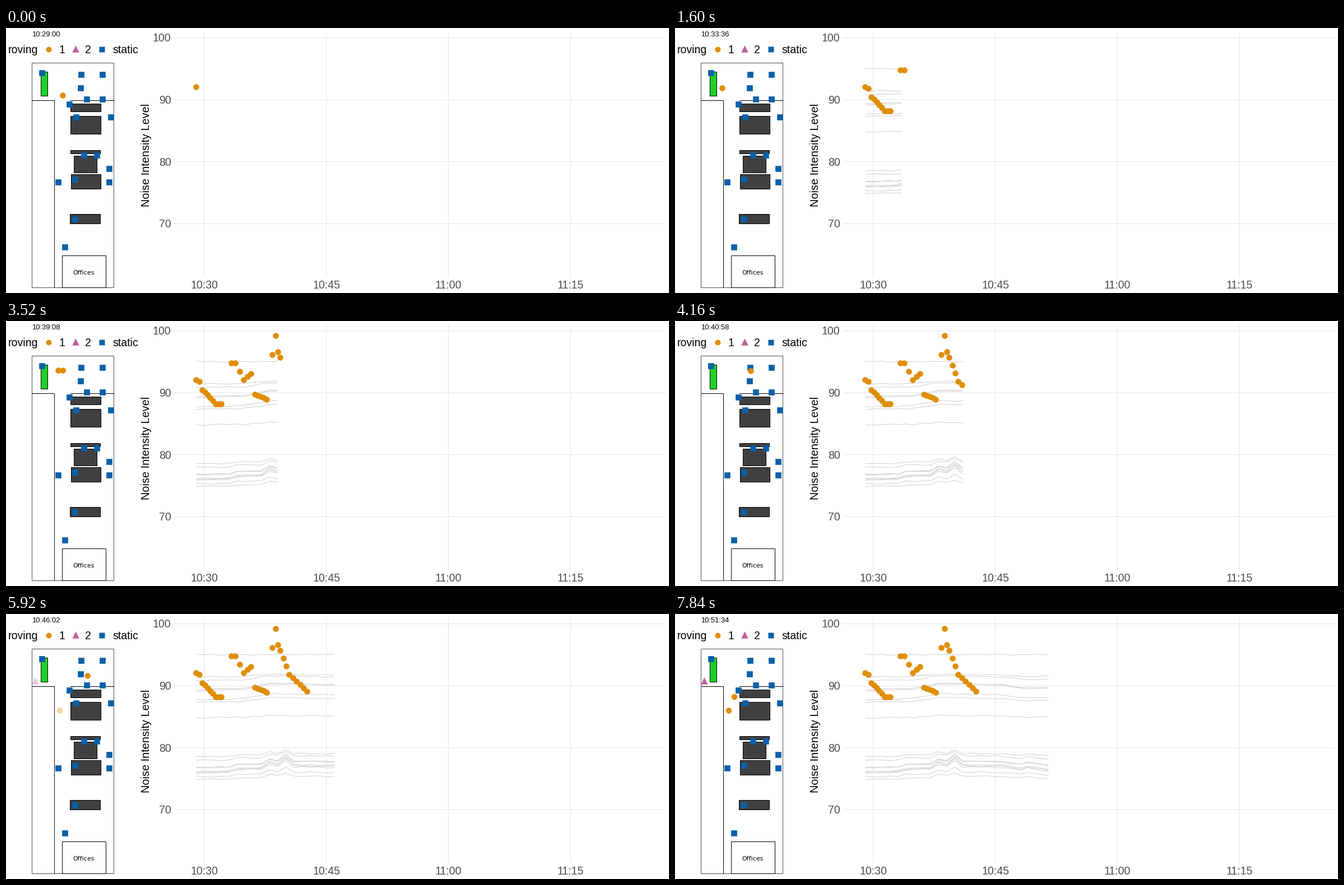
Write a matplotlib script that moves like this. It is 1183x473 px and loops after 8000 ms.

```python
import numpy as np
import matplotlib.pyplot as plt
from matplotlib.animation import FuncAnimation
from matplotlib.patches import Rectangle

plt.rcParams["path.snap"] = False

W, H, DPI = 1183, 473, 64
PT = 72 / DPI                      # points per pixel
FRAMES, INTERVAL = 50, 160
STEP = 27.633                      # clock seconds per frame
X0, MINUTE = 339, 14.515           # chart x at 10:29, pixels per minute

ORANGE, PINK, BLUE = "#DF8E06", "#BF6299", "#0A60A8"
GREY, GRID = "#4D4D4D", "#E8E8E8"

# Whole coordinates are pixel centres
fig = plt.figure(figsize=(W / DPI, H / DPI), dpi=DPI, facecolor="white")
ax = fig.add_axes([0, 0, 1, 1])
ax.set_xlim(-0.5, W - 0.5)
ax.set_ylim(H - 0.5, -0.5)
ax.axis("off")


def text(x, y, s, px=19.5, color="black", font="Liberation Sans", **kw):
    kw.setdefault("va", "baseline")
    return ax.text(x, y, s, fontsize=px * PT, color=color, family=font, **kw)


def line(xs, ys, color="black", px=1.0, z=3):
    return ax.plot(xs, ys, color=color, lw=px * PT, zorder=z,
                   solid_capstyle="butt")[0]


def box(x0, y0, x1, y1, fill, edge="black"):
    ax.add_patch(Rectangle((x0, y0), x1 - x0, y1 - y0, fc=fill, ec=edge,
                           lw=PT, zorder=2))


def marks(points, shape, color, px, z):
    xs, ys = zip(*points) if points else ((), ())
    return ax.scatter(xs, ys, s=(px * PT) ** 2, marker=shape, c=color,
                      linewidths=0, zorder=z)


def level_y(level):
    return 17 + (100 - level) * 11.05


# Chart grid and labels
for level in (100, 90, 80, 70):
    y = level_y(level)
    line([300, 1177], [y, y], GRID, 1.2, 1)
    text(294, y + 7, str(level), color=GREY, ha="right")
for i, label in enumerate(("10:30", "10:45", "11:00", "11:15")):
    x = X0 + MINUTE * (1 + 15 * i)
    line([x, x], [6, 445], GRID, 1.2, 1)
    text(x, 464.5, label, color=GREY, ha="center")
text(249.5, 226, "Noise Intensity Level", 19.9, rotation=90,
     ha="center", va="center")

# Legend
text(3.5, 44.5, "roving")
text(94, 44.5, "1")
text(141, 44.5, "2")
text(189.5, 44.5, "static")
marks([(76, 37)], "o", ORANGE, 10, 3)
marks([(123.5, 36.5)], "^", PINK, 12.5, 3)
marks([(171, 37)], "s", BLUE, 10, 3)
clock = text(45.5, 14.5, "", 13)

# Floor plan
box(46, 62, 192, 463, "white", "#505050")
line([46, 86, 86], [129, 129, 463])
line([114, 193], [129, 129])
box(62, 78, 74, 121, "#1FD026")
for rect in ((115, 135, 169, 149), (115, 157, 169, 189),
             (115, 218, 168, 224), (121, 228, 162, 258),
             (116, 261, 169, 287), (114, 332, 168, 349)):
    box(*rect, "#404040")
box(100, 406, 178, 463, "white")
text(138.5, 439, "Offices", 11, font="DejaVu Sans", ha="center")

STATIC = [(63.5, 79), (134, 82), (171.5, 82), (132.5, 106), (143.5, 126.5),
          (171.5, 126.5), (112.5, 135.5), (124.5, 158.5), (187, 158.5),
          (139, 226), (162, 226), (183.5, 250.5), (93, 274.5), (122.5, 269),
          (183.5, 274.5), (122.5, 340.5), (105, 390)]
marks(STATIC, "s", BLUE, 10.7, 4)

# Sensor levels: each starts at its own height and follows its group's drift
minutes = np.arange(25)
rng = np.random.default_rng(4)
HIGH = [95, 91.4, 90.8, 89.4, 89.2, 87.7, 87.3, 84.8]
LOW = [78.5, 77.9, 76.8, 76.7, 76.1, 76, 75.9, 75.3, 74.85]
HIGH_DRIFT = [(0, 0), (6, 0.2), (9, 1), (17, 0.8), (19, 0.3), (23, 0.3)]
LOW_DRIFT = [(0, 0), (4, 0.1), (5, 0.5), (8, 0.6), (9, 1.4), (10, 1.1),
             (11, 2), (12, 1), (17, 0.9), (19, 0.5), (20, 0.8), (23, 0.2)]


def sensor_curves(starts, drift, least, extra):
    shape = np.interp(minutes, *zip(*drift))
    for i, start in enumerate(starts):
        gain = least + extra * np.sin(np.pi * i / 8)
        jitter = rng.uniform(-0.1, 0.1, len(minutes))
        yield level_y(start + gain * shape + jitter)


curves = [*sensor_curves(HIGH, HIGH_DRIFT, 0, 1.1),
          *sensor_curves(LOW, LOW_DRIFT, 0.55, 0.6)]
traces = [line([], [], "#CFCFCF", 1) for _ in curves]
minute_frames = np.rint(minutes * 60 / STEP)

# Roving readings: key points (index, x, y), evenly filled in between
KEYS = [(0, 339, 104), (1, 344.5, 107), (2, 350, 122), (5, 364, 136),
        (7, 373.5, 147), (10, 384, 147),
        (11, 402, 74), (12, 409, 74), (14, 424, 104), (16, 437, 93),
        (17, 443.5, 130), (21, 465, 139),
        (22, 475, 59), (23, 480.5, 25), (24, 485, 54), (25, 489, 64),
        (28, 505, 107), (33, 537, 137)]
key_at, key_x, key_y = zip(*KEYS)
order = np.arange(key_at[-1] + 1)
xs = np.interp(order, key_at, key_x)
chart = np.column_stack([xs, np.interp(order, key_at, key_y)])
shown_at = np.rint((xs - X0) / (STEP / 60 * MINUTE)).astype(int)

# The walk sweeps three rows of the plan
walk = [(101 + 8.4 * i, 119) for i in range(10)] + [(52, 119)]
walk += [(52, 106), (84, 106)] + [(117 + 8.6 * i, 106) for i in range(9)]
walk += [(52, 88), (84, 88)] + [(93 + 8.4 * i, 88) for i in range(10)]

LAST = FRAMES - 1
stops = {}
for at, place in zip(shown_at, walk):
    stops.setdefault(at, []).append(place)
leave = max(stops)
stops[LAST] = [(105.5, 147.5), (95.5, 172)]

readings = marks([], "o", ORANGE, 10.6, 5)
rovers = marks([], "o", ORANGE, 10.6, 6)
second = marks([(52, 118.5)], "^", PINK, 12.5, 6)


def rover_state(frame):
    """Places and opacities: pairs glide, newcomers fade in, leavers fade out."""
    a = max(s for s in stops if s <= frame)
    b = min(s for s in stops if s >= frame)
    if a == b:
        return stops[a], [1] * len(stops[a])
    u = (frame - a) / (b - a)
    old, new = stops[a], stops[b]
    both = min(len(old), len(new))
    places = [(p[0] + u * (q[0] - p[0]), p[1] + u * (q[1] - p[1]))
              for p, q in zip(old, new)]
    alphas = [1] * both + [1 - u] * len(old[both:]) + [u] * len(new[both:])
    return places + old[both:] + new[both:], alphas


def update(frame):
    seconds = 29 * 60 + round(frame * STEP)
    clock.set_text(f"10:{seconds // 60:02d}:{seconds % 60:02d}")

    now = np.interp(frame, minute_frames, minutes)
    ts = np.append(minutes[minutes < now], now)
    for trace, curve in zip(traces, curves):
        trace.set_data(X0 + MINUTE * ts, np.interp(ts, minutes, curve))

    readings.set_offsets(chart[shown_at <= frame])
    places, alphas = rover_state(frame)
    rovers.set_offsets(places)
    rovers.set_facecolor([(ORANGE, a) for a in alphas])
    second.set_alpha(max(0, (frame - leave) / (LAST - leave)))
    return [clock, readings, rovers, second, *traces]


anim = FuncAnimation(fig, update, frames=FRAMES, interval=INTERVAL,
                     init_func=lambda: update(0), repeat=True, repeat_delay=0)
plt.show()
```
